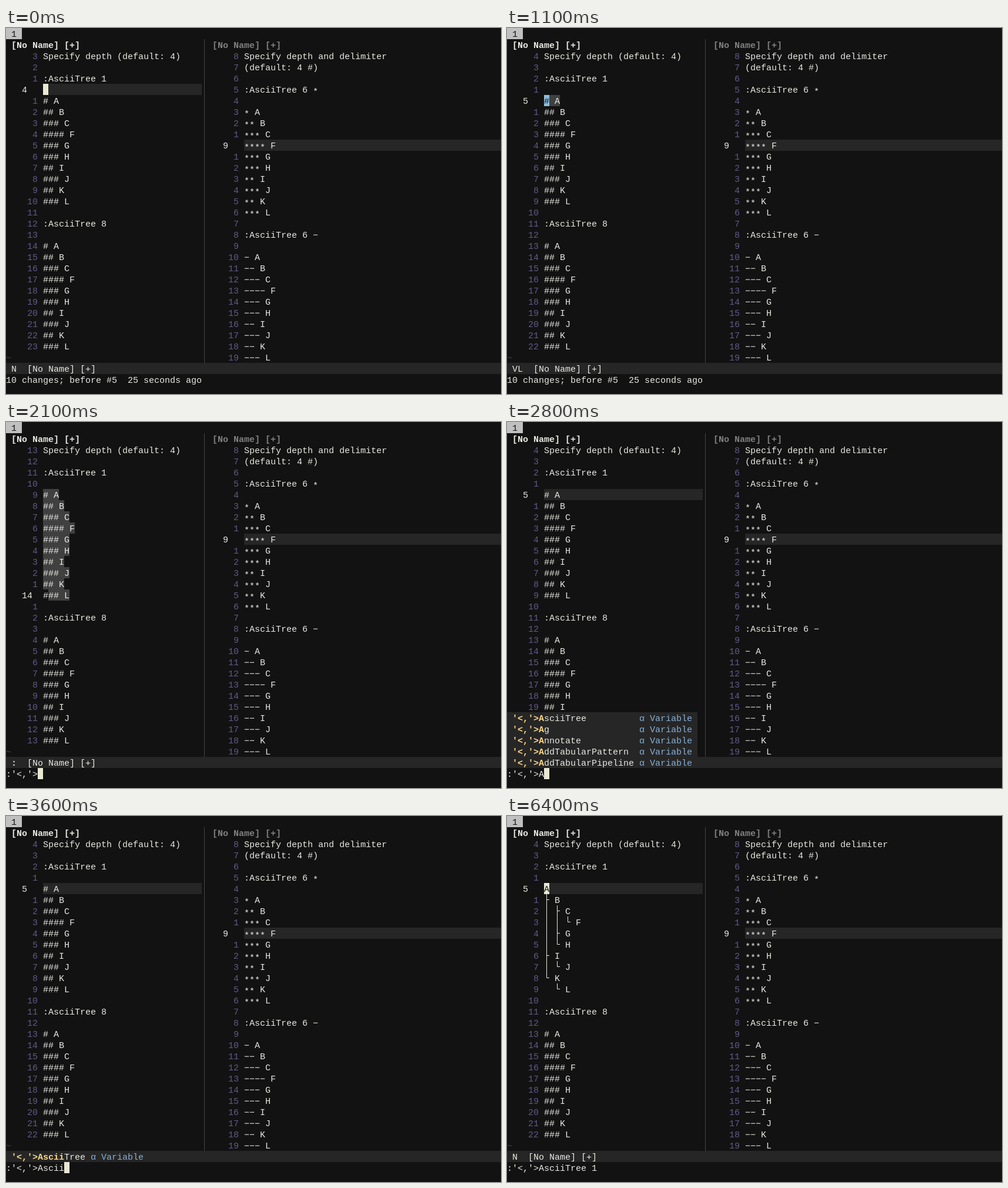
Animation, 842 px wide and 623 px high, one loop 8000 ms. Source, as an HTML page:

```html
<!DOCTYPE html>
<html lang="en">
<head>
<meta charset="utf-8">
<title>AsciiTree demo</title>
<style>
  html, body { margin: 0; width: 100%; height: 100%; overflow: hidden; background: #121212; }
  svg { display: block; width: 842px; height: 623px; }
  text { font: 15px "Liberation Mono", monospace; white-space: pre; fill: #e8e8e3; }
  .bold { font-weight: bold; }
  .inactive { font-weight: bold; fill: #808080; }
  .number { fill: #605a87; }
  .dim { fill: #484848; }
  .dark { fill: #121212; }
  .match { font-weight: bold; fill: #ffd787; }
  .kind { fill: #87afd7; }
  path { fill: none; stroke: #e8e8e3; }
</style>
</head>
<body>
<svg id="screen" viewBox="0 0 842 623"></svg>
<script>
const CELL = 9, ROW = 19, LOOP = 8000, FIRST_ROW = 2;
const CREAM = '#e8e8d3', BLUE = '#8fbfdc', PANEL = '#262626', SELECTED = '#404040';
const RANGE = "'<,'>", TREE = 'AsciiTree';
const screen = document.getElementById('screen');

const nodes = [[1, 'A'], [2, 'B'], [3, 'C'], [4, 'F'], [3, 'G'], [3, 'H'], [2, 'I'], [3, 'J'], [2, 'K'], [3, 'L']];
const outline = mark => nodes.map(([depth, name]) => mark.repeat(depth) + ' ' + name);
const branches = ['A', '├ B', '│ ├ C', '│ │ └ F', '│ ├ G', '│ └ H', '├ I', '│ └ J', '└ K', '  └ L'];

const leftLines = block => ['Specify depth (default: 4)', '', ':AsciiTree 1', '', ...block,
  '', ':AsciiTree 8', '', ...outline('#')];
const rightLines = ['Specify depth and delimiter', '(default: 4 #)', '', ':AsciiTree 6 *', '',
  ...outline('*'), '', ':AsciiTree 6 −', '', ...outline('−')];
const completions = [TREE, 'Ag', 'Annotate', 'AddTabularPattern', 'AddTabularPipeline'];

// Each step changes only the listed parts of the editor state.
const steps = [
  [0, { line: 4, mode: 'N', message: '10 changes; before #5  25 seconds ago' }],
  [500, { line: 5 }],
  [1100, { mode: 'VL', selecting: true }],
  [1700, { line: 14 }],
  [2100, { mode: ':', typed: '' }],
  [2800, { line: 5, selecting: false, typed: 'A', menu: completions, matched: 1 }],
  [3100, { typed: 'As', menu: [TREE], matched: 2 }],
  [3300, { typed: 'Asc', matched: 3 }],
  [3400, { typed: 'Asci', matched: 4 }],
  [3500, { typed: 'Ascii' }],
  [3600, { matched: 5 }],
  [3900, { typed: 'AsciiT', matched: 6 }],
  [4100, { typed: 'AsciiTr', matched: 7 }],
  [4200, { typed: 'AsciiTre', matched: 8 }],
  [4300, { typed: TREE, matched: 9 }],
  [4400, { typed: TREE + ' ' }],
  [4500, { menu: null }],
  [4600, { typed: TREE + ' 1' }],
  [6400, { mode: 'N', typed: null, message: ':' + RANGE + TREE + ' 1', done: true }]
];

const escape = text => text.replace(/&/g, '&amp;').replace(/</g, '&lt;');
const box = (col, row, width, color) =>
  `<rect x="${col * CELL}" y="${row * ROW}" width="${width}" height="${ROW}" fill="${color}"/>`;
const put = (col, row, text, style = '', shift = 0) =>
  `<text x="${col * CELL}" y="${row * ROW + 15 + shift}" class="${style}">${escape(text)}</text>`;
const cursor = (col, row, char = '', color = CREAM) =>
  box(col, row, CELL, color) + put(col, row, char, 'dark');

function branch(col, row, char) {
  const x = col * CELL + 4.5, y = row * ROW;
  const height = char === '└' ? 9.5 : ROW;
  const arm = char === '│' ? '' : `M${x} ${y + 9.5}h4.5`;
  return `<path d="M${x} ${y}v${height}${arm}"/>`;
}

function content(col, row, line) {
  const stars = line.match(/\*+/);
  if (stars) {
    const end = stars.index + stars[0].length;
    return put(col, row, line.slice(0, stars.index)) +
      put(col + stars.index, row, stars[0], '', 3) + put(col + end, row, line.slice(end));
  }
  const lines = [...line].map((char, i) => '│├└'.includes(char) ? branch(col + i, row, char) : '');
  return lines.join('') + put(col, row, line.replace(/[│├└]/g, ' '));
}

function pane(offset, lines, current) {
  return lines.map((line, i) => {
    const row = i + FIRST_ROW, gap = String(Math.abs(i + 1 - current));
    const number = gap === '0' ? put(offset + 3, row, String(current))
      : put(offset + 6 - gap.length, row, gap, 'number');
    return number + content(offset + 7, row, line);
  }).join('');
}

function menu(items, matched) {
  const longest = Math.max(...items.map(item => item.length)) + RANGE.length;
  const split = RANGE.length + matched;
  return items.map((item, i) => {
    const row = 31 - items.length + i, text = RANGE + item;
    return box(0, row, (longest + 13) * CELL, PANEL) +
      put(1, row, text.slice(0, split), 'match') + put(1 + split, row, text.slice(split)) +
      put(longest + 2, row, 'α', 'kind') + put(longest + 4, row, 'Variable', 'kind');
  }).join('');
}

function draw(state) {
  const lines = leftLines(state.done ? branches : outline('#'));
  const row = state.line + 1, typing = state.typed != null;
  let out = box(0, 0, 27, '#c0c0c0') + put(1, 0, '1', 'dark');
  out += put(1, 1, '[No Name] [+]', 'bold') + put(39, 1, '[No Name] [+]', 'inactive');
  out += '<rect x="337" y="19" width="1" height="551" fill="#444"/>';

  if (state.selecting) {
    for (let n = 5; n <= state.line; n++) {
      const skip = n === state.line ? 1 : 0;
      out += box(7 + skip, n + 1, (lines[n - 1].length - skip) * CELL, SELECTED);
    }
  } else {
    out += box(7, row, 270, PANEL);
  }
  out += box(45, 10, 437, PANEL);
  out += pane(0, lines, state.line) + pane(38, rightLines, 9);
  out += put(0, 29, '~', 'dim');
  if (!typing) out += cursor(7, row, lines[state.line - 1][0], state.selecting ? BLUE : CREAM);

  out += box(0, 30, 842, PANEL);
  out += state.menu ? menu(state.menu, state.matched)
    : put(1, 30, state.mode, state.mode === ':' ? 'bold' : '') +
      put(state.mode.length + 3, 30, '[No Name] [+]');

  const command = typing ? ':' + RANGE + state.typed : state.message;
  out += put(0, 31, command);
  if (typing) out += cursor(command.length, 31);
  screen.innerHTML = out;
}

let shown = -1;
function tick() {
  const time = performance.now() % LOOP;
  const count = steps.filter(([start]) => start <= time).length;
  if (count !== shown) {
    shown = count;
    draw(Object.assign({}, ...steps.slice(0, count).map(([, change]) => change)));
  }
  requestAnimationFrame(tick);
}
tick();
</script>
</body>
</html>
```
